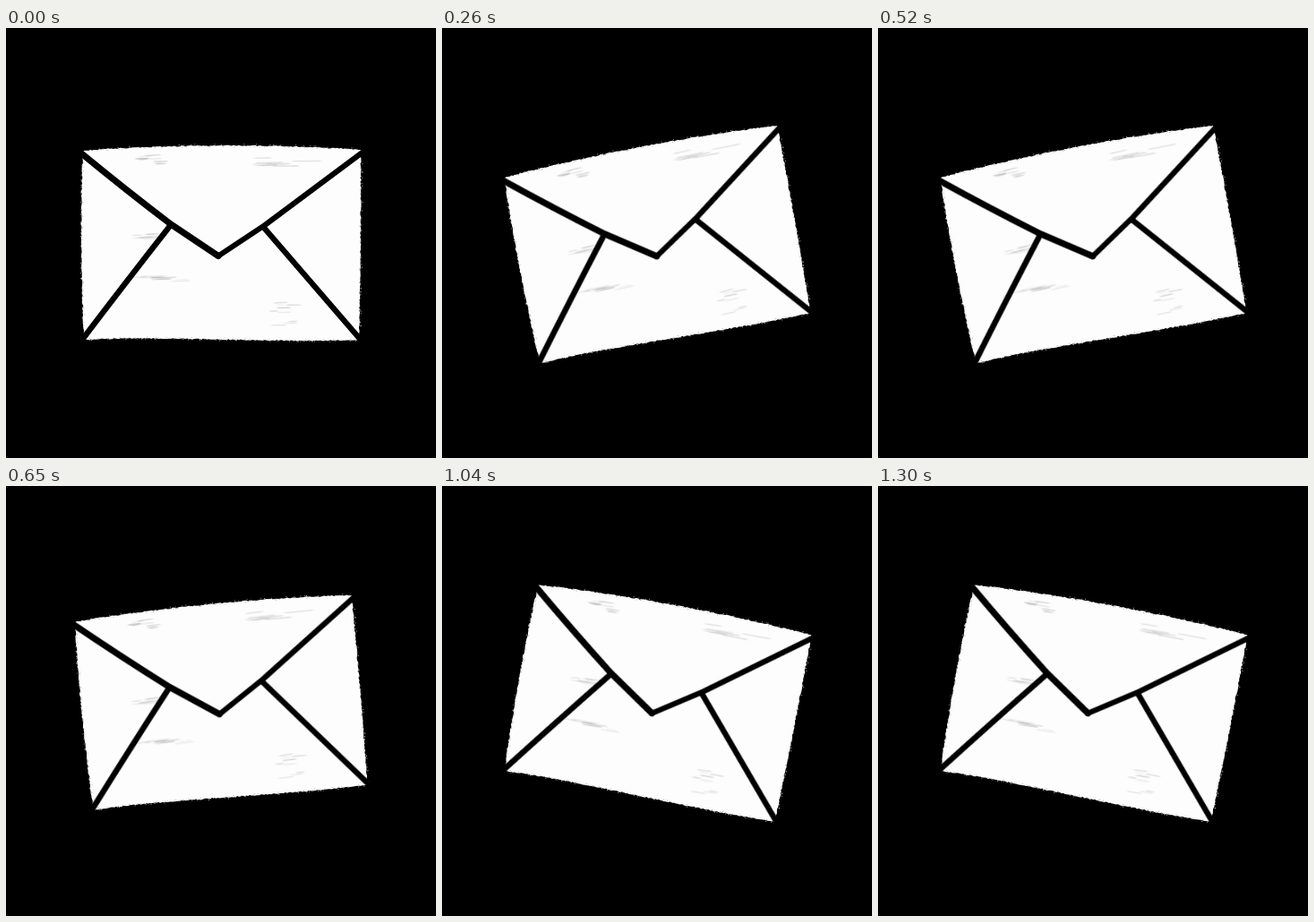
Recreate the animation shown at these times as an HTML page. Size 480 by 480 pixels, loop 1560 ms.

```html
<!DOCTYPE html>
<html lang="en">
<head>
<meta charset="utf-8">
<title>Wobbling envelope</title>
<style>
  html, body { margin: 0; width: 100%; height: 100%; overflow: hidden; background: #000; }
  svg { display: block; width: 100%; height: 100%; }
</style>
</head>
<body>
<svg viewBox="0 0 480 480">
  <defs>
    <filter id="soft" x="-20%" y="-20%" width="140%" height="140%">
      <feGaussianBlur stdDeviation="1 0.5"/>
    </filter>
    <path id="outline" d="M86 137C170 130 300 129 396 136Q396.5 250 394 348C300 352 170 343 87 348Q81.5 230 86 137Z"/>
  </defs>
  <g id="envelope">
    <path id="paper" fill="#fdfdfd"/>
    <path id="fringe" stroke="#aaa" fill="none"/>
    <g id="smudges" stroke="#777" stroke-width="1.4" stroke-linecap="round" fill="none" filter="url(#soft)"/>
    <g stroke="#000" stroke-width="6.4" fill="none" stroke-linejoin="round" stroke-linecap="round">
      <path d="M83 139Q134 181 184 219L237 254.5" stroke-width="7.2"/>
      <path d="M237 254.5L289 220L399 138" stroke-width="6"/>
      <path d="M85 348Q132 286 183 221"/>
      <path d="M288 223Q342 286 395 347"/>
    </g>
  </g>
</svg>
<script>
const STEP = 130;
const STEPS = 12;
const HALF = STEPS / 2;

let seed = 7;
function random() {
  seed = (seed * 16807) % 2147483647;
  return seed / 2147483647;
}
const jitter = amount => (random() * 2 - 1) * amount;
const byId = id => document.getElementById(id);

// Rough-edged paper: the smooth outline with small random offsets.
function drawPaper() {
  const outline = byId("outline");
  const length = outline.getTotalLength();
  const edge = [];
  let specks = "";
  for (let s = 0; s < length; s += 2) {
    const { x, y } = outline.getPointAtLength(s);
    edge.push(`${x + jitter(.6)} ${y + jitter(.6)}`);
    if (random() < .5) specks += `M${x + jitter(1.6)} ${y + jitter(1.6)}h1`;
  }
  byId("paper").setAttribute("d", `M${edge.join("L")}Z`);
  byId("fringe").setAttribute("d", specks);
}

// A cluster of faint horizontal brush streaks around a point.
function smudge(x, y, width, height) {
  let streaks = "";
  for (let i = 0; i < 9; i++) {
    const length = width * (.2 + random() * .4);
    const left = x + jitter(width / 2) - length / 2;
    streaks += `<path d="M${left} ${y + jitter(height / 2)}l${length} ${-random()}" opacity="${.08 + random() * .2}"/>`;
  }
  return streaks;
}

function drawSmudges() {
  byId("smudges").innerHTML =
    smudge(162, 147, 26, 10) +
    smudge(316, 149, 64, 14) +
    smudge(164, 233, 36, 6) +
    smudge(172, 280, 50, 6) +
    smudge(310, 316, 28, 32);
}

// Swings left, then right; the outermost step gets an extra kick,
// and the last tilt is held before snapping back to rest.
function angleAt(time) {
  const step = Math.min(Math.floor(time / STEP) % STEPS, STEPS - 2);
  const reach = HALF / 2 - Math.abs(step % HALF - HALF / 2);
  const side = step < HALF ? -1 : 1;
  return side * (5.3 * reach + 2.4 * Math.max(0, reach - 2));
}

function render(time) {
  byId("envelope").setAttribute("transform", `rotate(${angleAt(time)} 240 240)`);
}

drawPaper();
drawSmudges();

const start = performance.now();
(function tick() {
  render(performance.now() - start);
  requestAnimationFrame(tick);
})();
</script>
</body>
</html>
```
